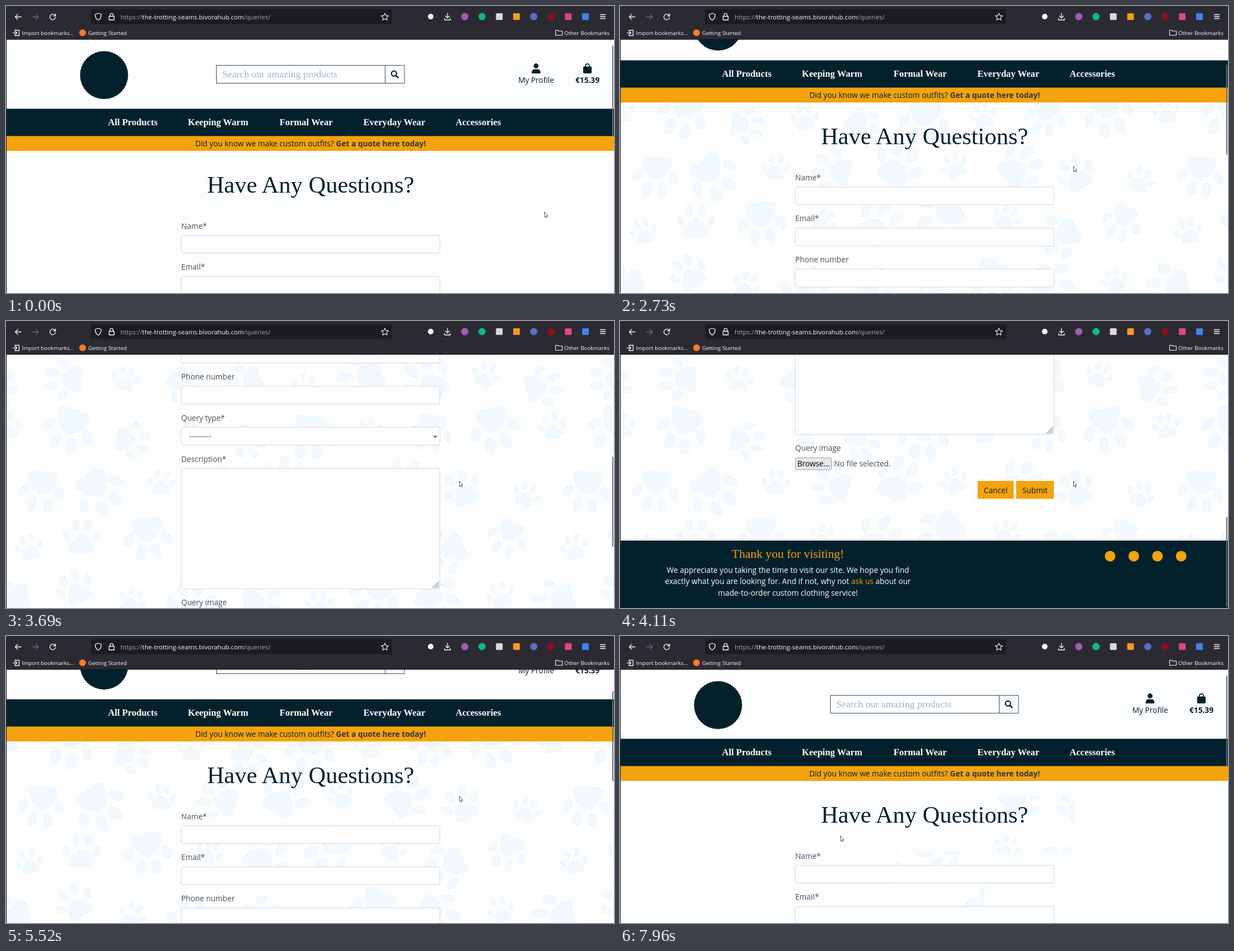
These frames come from a looping animation (1088x515 px, 8 s). An HTML page:

```html
<!DOCTYPE html>
<html lang="en">
<head>
<meta charset="utf-8">
<title>Questions page</title>
<style>
  html, body { margin: 0; width: 100%; height: 100%; overflow: hidden; background: #fbfdff; }
  svg { display: block; width: 100vw; height: 100vh; }
  text { font: 13.7px "Open Sans", "Noto Sans", sans-serif; fill: #03212c; white-space: pre; }
  .serif { font-family: "Liberation Serif", serif; }
  .label { fill: #4b5157; }
  .b { font-weight: 700; }
  .mid { text-anchor: middle; }
  .ui { font-size: 9.8px; fill: #fbfbfe; }
  .line { fill: none; stroke: #fbfbfe; stroke-width: 1.3; stroke-linecap: round; stroke-linejoin: round; }
</style>
</head>
<body>
<svg viewBox="0 0 1088 515" preserveAspectRatio="none">
  <defs>
    <g id="paw">
      <path d="M0-.1C.15-.1 .32.14 .32.3C.32.46 .13.4 0 .4C-.13.4-.32.46-.32.3C-.32.14-.15-.1 0-.1Z"/>
      <ellipse rx=".1" ry=".16" transform="translate(-.39 -.03) rotate(-28)"/>
      <ellipse rx=".11" ry=".17" transform="translate(-.16 -.31) rotate(-8)"/>
      <ellipse rx=".11" ry=".17" transform="translate(.16 -.31) rotate(8)"/>
      <ellipse rx=".1" ry=".16" transform="translate(.39 -.03) rotate(28)"/>
    </g>
  </defs>
  <rect width="1088" height="515" fill="#fefefe"/>
  <g id="paws" fill="#f1f9fe"></g>
  <g id="blanks"></g>
  <path id="veil" fill="#fbfdff" fill-rule="evenodd"/>
  <g id="page"></g>
  <rect id="thumb" x="1084.8" width="2" height="162" rx="1" fill="#6c6f72"/>
  <g id="chrome">
    <rect y="60" width="1.2" height="455" fill="#2b2a33"/>
    <rect width="1088" height="60" fill="#2b2a33"/>
    <rect y="59.5" width="1088" height="1" fill="#17161c"/>
    <rect x="152" y="5.5" width="539" height="27" rx="3.5" fill="#1c1b22"/>
    <g class="line">
      <path d="M27 19.5H16.5M21 15l-4.5 4.5L21 24"/>
      <path d="M47 19.5H58M53.5 15l4.5 4.5L53.5 24" stroke="#6b6a72"/>
      <path d="M87.5 16.5A5 5 0 1 0 88.5 20.5M88.7 14.2V17.8H85"/>
      <path d="M165 13l5.3 2C170.5 20 168.5 23.5 165 25.5C161.5 23.5 159.5 20 159.7 15Z"/>
      <path d="M184.5 18.5h9v6.5h-9ZM186.3 18.5V16a2.7 2.7 0 0 1 5.4 0V18.5"/>
      <path id="star" stroke-width="1.1"/>
      <path d="M790 13V21M786.5 18l3.5 3.5L793.5 18M784.8 22.5V25H795.2V22.5"/>
      <path d="M1063.5 15.5h9m-9 3.5h9m-9 3.5h9"/>
      <path d="M16 45.5V43.5H23.5V53H16V51M12.5 48.3H19.5M17.3 46l2.3 2.3L17.3 50.6"/>
      <path d="M983.5 43.5H987.5L989 45H995.5V52.5H983.5Z" stroke-width="1.1"/>
    </g>
    <text class="ui" y="23.5" x="205" style="font-size:11.4px"><tspan fill="#a9a8ae">https://</tspan>the-trotting-seams.bivorahub.com<tspan fill="#a9a8ae">/queries/</tspan></text>
    <text class="ui" x="28.5" y="52">Import bookmarks...</text>
    <text class="ui" x="147" y="52">Getting Started</text>
    <text class="ui" x="999" y="52">Other Bookmarks</text>
  </g>
  <path id="cursor" d="M.5.5V10L2.6 8.2L4 11.2L5.4 10.5L4.1 7.6H6.6Z" fill="#fff" stroke="#33363a" stroke-width=".8"/>
</svg>
<script>
const $ = id => document.getElementById(id);
const NAVY = '#03212c', GOLD = '#f4a20d';

const range = n => [...Array(n).keys()];
const repeat = (n, fn) => range(n).map(fn).join('');
const rect = (x, y, w, h, fill, more = '') =>
  `<rect x="${x}" y="${y}" width="${w}" height="${h}" fill="${fill}" ${more}/>`;
const dot = (x, y, r, fill) => `<circle cx="${x}" cy="${y}" r="${r}" fill="${fill}"/>`;
const text = (x, y, s, cls = '', style = '') =>
  `<text x="${x}" y="${y}" class="${cls}" style="${style}">${s}</text>`;
const path = (d, more) => `<path d="${d}" ${more}/>`;

// Wallpaper: a loose 9 by 5 lattice, each row shifted, every third paw small
let seed = 7;
const random = () => (seed = seed * 16807 % 2147483647) / 2147483647;
const jitter = n => (random() - .5) * n;
const PERIOD = 975, PITCH = PERIOD / 9, SHIFT = [-7, 5, 58, 35, 15];

function paw(col, row) {
  const x = SHIFT[row] + col * PITCH + jitter(16), y = 103 + row * 98 + jitter(34);
  const small = (col + (row + 1) % 2) % 3 === 0;
  const size = small ? 51 : 80 + jitter(26);
  const turn = small ? jitter(60) : random() * 360;
  return [x, x + PERIOD].map(v =>
    `<use href="#paw" transform="translate(${v} ${y}) rotate(${turn}) scale(${size})"/>`).join('');
}
$('paws').innerHTML = repeat(45, i => paw(i % 9, Math.floor(i / 9)));

const LABELS = ['Name*', 'Email*', 'Phone number', 'Query type*', 'Description*'];
const fieldBox = (i, fill, more) =>
  rect(313.5, 411.5 + i * 73.75, 463, i < 4 ? 32 : 216, fill, 'rx="3.5" ' + more);

$('blanks').innerHTML = rect(0, 60, 1088, 125, '#fefefe') +
  repeat(LABELS.length, i => fieldBox(i, '#fefefe', ''));

function header() {
  const edge = 'stroke="#3f4c52" stroke-width="1"';
  const nav = [[183, 'All Products'], [326, 'Keeping Warm'], [490, 'Formal Wear'],
    [640, 'Everyday Wear'], [805, 'Accessories']];
  return dot(175.5, 124, 43, NAVY) +
    rect(376.5, 106.5, 302, 32, 'none', edge) + rect(678.5, 106.5, 34.5, 32, 'none', edge) +
    text(387, 128, 'Search our amazing products', 'serif', 'font-size:17.7px;fill:#a5b3c0') +
    `<circle cx="694.3" cy="121.2" r="4.5" fill="none" stroke="${NAVY}" stroke-width="2.2"/>` +
    path('M697.8 124.7l3.7 3.7', `stroke="${NAVY}" stroke-width="2.6" stroke-linecap="round"`) +
    dot(948.5, 107.5, 4.4, NAVY) +
    path('M940.8 121V119C940.8 115.5 943 113.5 946 113.5H951C954 113.5 956.3 115.5 956.3 119V121Z', `fill="${NAVY}"`) +
    rect(1032.8, 108.5, 15.2, 12.5, NAVY, 'rx="2"') +
    path('M1036.7 111V107.5a3.7 3.7 0 0 1 7.4 0V111', `fill="none" stroke="${NAVY}" stroke-width="1.7"`) +
    text(948.7, 138, 'My Profile', 'mid') + text(1040.5, 138, '€15.39', 'mid b') +
    rect(0, 233, 1088, 27, GOLD) + rect(0, 184.4, 1088, 49, NAVY) +
    nav.map(([x, s]) => text(x - .5, 214, s, 'serif b', 'font-size:16.6px;fill:#fff')).join('') +
    text(545, 252, 'Did you know we make custom outfits? <tspan class="b" fill="#2c363c">Get a quote here today!</tspan>', 'mid');
}

function form() {
  const button = (x, w, s) => rect(x, 1006, w, 32, GOLD) + text(x + w / 2, 1027.5, s, 'mid');
  return text(545, 335, 'Have Any Questions?', 'serif mid', 'font-size:42.5px') +
    repeat(LABELS.length, i => text(313.5, 399.5 + i * 73.75, LABELS[i], 'label') +
      fieldBox(i, 'none', 'stroke="#ced4da" stroke-width=".9"')) +
    text(327.5, 653.5, '---------', 'label') +
    path('M765.2 647.5l3 3.2l3-3.2', 'fill="none" stroke="#343a40" stroke-width="1.5"') +
    path('M763 921l12-12M767 921l8-8M771 921l4-4', 'stroke="#555"') +
    text(313.5, 952, 'Query image', 'label') +
    rect(314, 964.3, 64.5, 21.5, '#e9e9ed', 'rx="3" stroke="#8f8f9d" stroke-width=".9"') +
    text(346.2, 980, 'Browse...', 'mid', 'fill:#000') +
    text(383, 980, 'No file selected.', 'label') +
    button(640, 64.5, 'Cancel') + button(709, 67.5, 'Submit');
}

function footer() {
  const lines = ['We appreciate you taking the time to visit our site. We hope you find',
    `exactly what you are looking for. And if not, why not <tspan fill="${GOLD}">ask us</tspan> about our`,
    'made-to-order custom clothing service!'];
  return rect(0, 1113, 1088, 130, NAVY) +
    text(300.5, 1144, 'Thank you for visiting!', 'serif mid', `font-size:21.6px;fill:${GOLD}`) +
    lines.map((s, i) => text(300.5, 1170.5 + 20.6 * i, s, 'mid', 'fill:#fff')).join('') +
    repeat(4, i => dot(877 + i * 42.4, 1141, 9.5, GOLD));
}
$('page').innerHTML = header() + form() + footer();

// Toolbar badges
const BADGES = ['#a45bb5', '#11b981', '#d9d9db', '#f59a1b', '#5a6fc8', '#8c1020', '#e0457f', '#3f83ee'];
const badge = (c, i) => {
  const x = 821 + i * 30.85;
  return i % 4 > 1 ? rect(x - 6, 13, 12, 12, c, 'rx="1.5"') : dot(x, 19, 6.5, c);
};
$('chrome').insertAdjacentHTML('beforeend',
  BADGES.map(badge).join('') + dot(760, 19, 5, '#fbfbfe') + dot(137, 48, 6, '#ff7a2a'));

const spikes = range(10).map(i => {
  const a = Math.PI * (i / 5 - .5), r = i % 2 ? 3.2 : 6.8;
  return `${678 + r * Math.cos(a)} ${19.7 + r * Math.sin(a)}`;
});
$('star').setAttribute('d', 'M' + spikes.join('L') + 'Z');

// A move shows its steps evenly from first to last; lead is how long it ran before the first
const LOOP = 8000;
const SCROLL = [
  { first: 2610, last: 3690, steps: 9, lead: 30, to: [442] },
  { first: 3960, last: 4110, steps: 2, lead: 150, to: [719] },
  { first: 4670, last: 5250, steps: 5, lead: 170, to: [123] },
  { first: 5520, last: 5800, steps: 3, lead: 140, to: [0] }
];
const POINTER = [
  { first: 150, last: 780, steps: 6, lead: 130, to: [904, 331] },
  { first: 1490, last: 2480, steps: 8, lead: 130, to: [811, 287] },
  { first: 6740, last: 7690, steps: 8, lead: 130, to: [492, 488] },
  { first: 7810, last: 7960, steps: 2, lead: 150, to: [394, 358] }
];
const START = [963, 369];

function progress({ first, last, steps, lead }, t) {
  if (t < first) return 0;
  const span = last - first, step = span / (steps - 1);
  const k = Math.min(steps - 1, Math.floor((t - first + 15) / step));
  return 1 - (1 - (lead + k * step) / (lead + span)) ** 1.36;
}
const mix = (a, b, u) => a.map((v, i) => v + (b[i] - v) * u);
const glide = (from, moves, t) => moves.reduce((p, m) => mix(p, m.to, progress(m, t)), from);

const box = ([l, t], [r, b]) => `M${l} ${t}H${r}V${b}H${l}Z`;

// At the top of the page the wallpaper is hidden, except in two boxes along each long pointer move
function veil(t) {
  const down = SCROLL[0].first, up = SCROLL[3].last;
  if (t >= down && t < up) return '';
  let d = box([0, 60], [1088, 515]), from = START;
  for (const m of POINTER) {
    const u = progress(m, t);
    if (m.steps > 2 && (t < down || m.first > up))
      for (const a of [0, .5])
        if (u > a) d += box(mix(from, m.to, a), mix(from, m.to, Math.min(u, a + .5)));
    from = m.to;
  }
  return d;
}

function draw() {
  const t = performance.now() % LOOP;
  const [y] = glide([0], SCROLL, t);
  for (const id of ['page', 'blanks']) $(id).setAttribute('transform', `translate(0 ${-y})`);
  $('thumb').setAttribute('y', 71 + y * .39);
  $('cursor').setAttribute('transform', `translate(${glide(START, POINTER, t)})`);
  $('veil').setAttribute('d', veil(t));
  requestAnimationFrame(draw);
}
draw();
</script>
</body>
</html>
```
